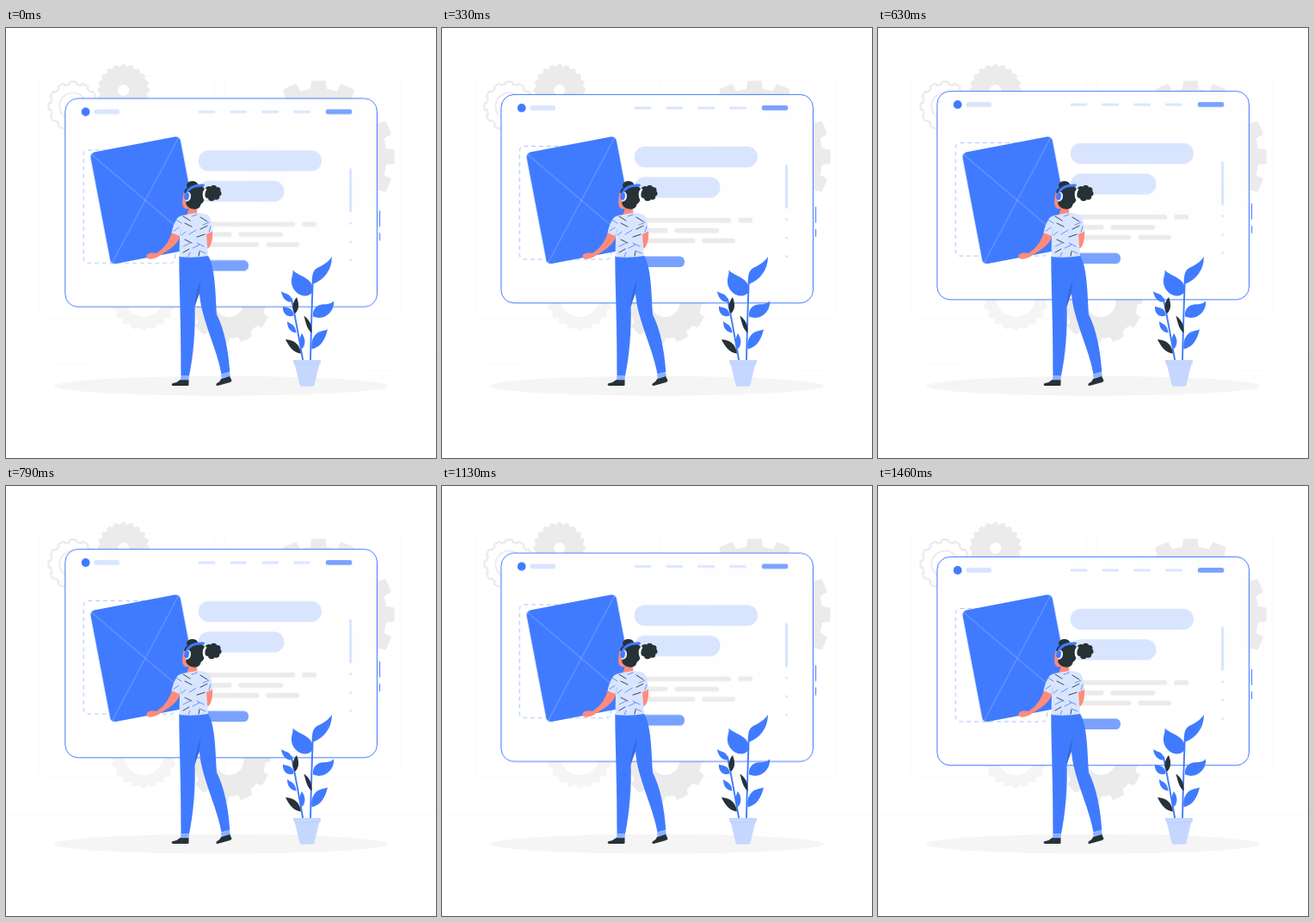
Recreate the animation shown at these times as an HTML page. Size 500 by 500 pixels, loop 1500 ms.

```html
<!DOCTYPE html>
<html lang="en">
<head>
<meta charset="utf-8">
<title>Website builder</title>
<style>
  html, body { margin: 0; width: 100%; height: 100%; overflow: hidden; background: #fff; }
  svg { display: block; width: 100vw; height: 100vh; }
  .blue { fill: #407bff; }
  .pale { fill: #d9e5ff; }
  .mid { fill: #79a2ff; }
  .grey { fill: #ebebeb; }
  .dark { fill: #263238; }
  .skin { fill: #ff8b7b; }
  .line { fill: none; stroke: #407bff; stroke-linecap: round; }
  /* 24 steps per second, rising and falling at constant speed */
  #window { animation: hover 1.5s steps(18, start) -5ms infinite; }
  @keyframes hover {
    0%, 100% { transform: translateY(0); }
    50% { transform: translateY(-10px); }
  }
</style>
</head>
<body>
<svg viewBox="0 0 500 500">
  <defs>
    <clipPath id="shirtClip">
      <path id="shirt" d="M210 217C204 218 200 219 198 223C195 228 193.500 233 192.500 238L202 242L201.500 266Q218 268 235 265L233 240L240 236.500C240 229 238 221 235 217.500Q229 214.500 222 215Z"/>
    </clipPath>
  </defs>

  <g id="backdrop">
    <g fill="none" stroke="#ebebeb" stroke-width=".25">
      <rect x="38.500" y="55.200" width="204" height="282.400" rx="5.500"/>
      <rect x="254.500" y="55.200" width="204" height="282.400" rx="5.500"/>
    </g>
    <g class="grey">
      <rect y="382.300" width="500" height=".25"/>
      <rect x="416.800" y="398.500" width="33" height=".25"/>
      <rect x="396.600" y="389.200" width="19" height=".25"/>
      <rect x="52.500" y="390.800" width="43" height=".25"/>
      <rect x="104.500" y="390.800" width="6" height=".25"/>
      <rect x="131.500" y="395.100" width="93" height=".25"/>
    </g>
    <g id="gears"></g>
    <ellipse cx="250" cy="416.200" rx="194" ry="11.300" fill="#f5f5f5"/>
  </g>

  <g id="window">
    <rect x="68.800" y="82.400" width="362.700" height="242.400" rx="15" fill="#fff" fill-opacity=".94" stroke="#407bff"/>
    <circle class="blue" cx="92.600" cy="98" r="4.900"/>
    <g id="bars"></g>
    <g class="pale">
      <circle cx="400.600" cy="227.500" r="1.500"/>
      <circle cx="400.600" cy="249.100" r="1.500"/>
      <circle cx="400.600" cy="270.600" r="1.500"/>
    </g>
    <path class="line" d="M434.700 213.300V231.100M434.700 239.100V247.300"/>
    <rect x="90.200" y="142.400" width="106.300" height="131.600" rx="5" fill="none" stroke="#a6c2ff" stroke-dasharray="5 3.800"/>
  </g>

  <g transform="translate(162 200.300) rotate(-10.800)">
    <rect class="blue" x="-53.200" y="-65.900" width="106.400" height="131.800" rx="5.500"/>
    <path d="M-51.600 -64.300L51.600 64.300M51.600 -64.300L-51.600 64.300" stroke="#8cb0ff" stroke-width=".8"/>
  </g>

  <g id="plant">
    <g class="line" stroke-width="1.900">
      <path d="M354 388C354.500 360 355.500 330 356.800 291"/>
      <path d="M345.500 388C341 362 337 340 332 315"/>
    </g>
    <g class="blue">
      <path d="M356.500 298C355 284 358 280.500 366 277C372 274 376 270 379 266C379 281 370 293 356.500 298Z"/>
      <path d="M333.500 281.500C341 289.500 357.500 290 357.200 306C354 311 349 312.300 344 311C335.500 308 331 300 332 292.500C332.500 288 334 286 333.500 281.500Z"/>
      <path d="M357 335.500C356 325 363 321.500 370 321.300C376 321 379 320 381 317.500C382.500 329 371 341 357 335.500Z"/>
      <path d="M355.500 373.500C354 362 359 356 364 353.500C368 351.500 371 352 374 350.500C371 363 366 371 355.500 373.500Z"/>
      <path d="M320 306C325 310 331.500 308 333 318.500C326 319.500 321 314 320 306Z"/>
      <path d="M322 323.500C326 326 334 324 334.500 334.500C328 337.500 321 332 322 323.500Z"/>
      <path d="M327 341C331 345 336.500 344 337.500 354.500C331 354 327 349 327 341Z"/>
      <path d="M344 355C348 361 349 367 344.500 373C339 368 341 361 344 355Z"/>
    </g>
    <g class="dark">
      <path d="M346.500 334.500C352 339.500 356 343 355.500 354.500C350.500 351 348.500 343 346.500 334.500Z"/>
      <path d="M338 313C341.500 322 340.500 328 336 332C332 326 333 319 338 313Z"/>
      <path d="M325 362.300C333 362.800 341 365.500 343 378.500C335 378.500 329 370.500 325 362.300Z"/>
    </g>
    <path fill="#c6d7ff" d="M334.500 386H365.500Q366.300 386 366.100 387L365.300 391H364.300L358.500 415Q358 416.800 356 416.800H344Q342 416.800 341.500 415L335.700 391H334.700L333.900 387Q333.700 386 334.500 386Z"/>
    <path d="M335.800 390.900H364.200" stroke="#b3c9ff" stroke-width=".6"/>
  </g>

  <g id="woman">
    <path class="skin" d="M232 236L240 235C240.500 243 239.500 250 237 254C235 257 231 258 228 257Z"/>
    <g class="dark">
      <path d="M203 408.800L212.500 409V415.300Q212.500 416 211 416H194Q191.500 415 193.500 413.300Q199 412.500 203 408.800Z"/>
      <path d="M250.500 407.500L260 404.500L262.500 410Q262.500 411.200 260.500 412L246 416Q243.500 415.500 244.800 413.500Q249 411.500 250.500 407.500Z"/>
    </g>
    <path class="blue" d="M201.300 265C201.300 300 203.700 340 203.500 404.500H213C218 380 220.500 350 219.500 325C222 315 224 312 225 309C226 322 229 332 233 345C239 364 247 383 250.500 402.500L260.300 400C258.500 373 253.500 350 245 333C243.500 310 243.500 277 234.500 264Z"/>
    <path d="M226.500 294C225.500 306 223 313 219.500 324C220 311 223 302 226.500 294Z" fill="#3061cc" fill-opacity=".75"/>
    <path d="M203.300 404.300H213L212.500 409.300H203.200ZM249.900 402.800L260.200 400.200L260.800 404.800L251 408Z" fill="#8cb0ff"/>

    <path class="skin" d="M193 237L203.500 240C200 250 194 255 187 259.500C181 263 177 266.800 171.500 268C168 269 164.500 269 163.700 267C162.700 263.500 165 261.800 169 261.500L175.500 261.700C182 257 189 251 193 237Z"/>
    <path class="skin" d="M211 206L221.500 207L222.500 216Q217 219 210 217.500L212.500 211Z"/>
    <use href="#shirt" class="pale"/>
    <g clip-path="url(#shirtClip)" fill="none" stroke-linecap="round">
      <path stroke="#263238" stroke-width=".9" d="M206 219l8 5M226 220l8 5M208 227l8 4M226 234l8-4M208 246l8 4M222 243l9-3M206 261l7-4M224 265l1-5"/>
      <path stroke="#407bff" stroke-width=".8" d="M198 223l6 4M216 219l6-2M195 236l6-4M229 229l7-3M213 240l8-5M204 241l5-4M222 250l8 4M206 254l8-4M217 256l8-4M225 259l7 3M212 266l2-5M236 237l2-6"/>
    </g>
    <path d="M201.700 241.500L204 234" stroke="#9dbbff" stroke-width=".6"/>

    <path class="skin" d="M207 190C205.500 195 204.700 202 205.500 206C206.500 210.500 210 210.800 213.500 210L220 206L217 191Z"/>
    <g class="dark">
      <path d="M207 191.500C208 187 211 185 214 184L224 182.500C231 184 233.500 190 232 196C231 200 229.500 203 226.500 205C226 209.500 221.500 211.300 218 210.500C213 210 209.500 207 209 203L212 200L209.500 193Z"/>
      <ellipse cx="216.700" cy="183" rx="6.700" ry="5"/>
      <g id="tail">
        <circle cx="236" cy="188.500" r="4.500"/><circle cx="241.500" cy="186.500" r="3.800"/>
        <circle cx="246" cy="188.500" r="3.500"/><circle cx="247.500" cy="192.500" r="3"/>
        <circle cx="244.500" cy="196" r="3.800"/><circle cx="239" cy="197.300" r="4"/>
        <circle cx="235.200" cy="193.500" r="4.600"/><circle cx="241" cy="191.500" r="5"/>
      </g>
    </g>
    <path d="M232.500 187Q227.500 193 232 200.500" fill="none" stroke="#fff" stroke-width="2.600"/>
    <path d="M210 192C212 187 218 182.500 229.500 183" fill="none" stroke="#407bff" stroke-width="3" stroke-linecap="round"/>
    <ellipse cx="211.500" cy="196" rx="3.500" ry="5.500" fill="#e6eeff" transform="rotate(10 211 196)"/>
    <ellipse class="blue" cx="210" cy="195.700" rx="2.800" ry="4.400" transform="rotate(10 210 196)"/>
  </g>
</svg>
<script>
  const add = (parent, tag, attrs) => {
    const el = document.createElementNS('http://www.w3.org/2000/svg', tag);
    for (const key in attrs) el.setAttribute(key, attrs[key]);
    document.getElementById(parent).append(el);
  };

  // Toothed outline; turn is the first tooth's offset from the top, in teeth.
  const teeth = (cx, cy, tip, root, count, turn = 0) => {
    const step = 2 * Math.PI / count;
    const points = [];
    for (let i = 0; i < count; i++) {
      for (const [r, part] of [[root, -.31], [tip, -.24], [tip, 0], [tip, .24], [root, .31], [root, .5]]) {
        const a = (i + part + turn) * step - Math.PI / 2;
        points.push((cx + r * Math.cos(a)).toFixed(2) + ' ' + (cy + r * Math.sin(a)).toFixed(2));
      }
    }
    return 'M' + points.join('L') + 'Z';
  };
  const hole = (cx, cy, r) => `M${cx - r} ${cy}a${r} ${r} 0 1 0 ${2 * r} 0a${r} ${r} 0 1 0 ${-2 * r} 0Z`;
  const gear = (cx, cy, tip, root, count, bore, fill, turn) => add('gears', 'path', {
    d: teeth(cx, cy, tip, root, count, turn) + hole(cx, cy, bore), fill, 'fill-rule': 'evenodd'
  });

  add('gears', 'path', {
    d: teeth(78, 91, 28.7, 26, 12), fill: 'none', stroke: '#ebebeb', 'stroke-width': 2.2, 'stroke-linejoin': 'round'
  });
  add('gears', 'circle', { cx: 78, cy: 91, r: 15.7, fill: 'none', stroke: '#ebebeb', 'stroke-width': 1.8 });
  gear(136.6, 72.3, 30.2, 28, 20, 6.5, '#ebebeb');
  gear(363.5, 149.5, 88.3, 79, 16, 45, '#ebebeb');
  gear(160, 313, 38.3, 35.5, 20, 23, '#f5f5f5');
  gear(259.5, 319, 48, 42, 10, 17, '#ebebeb', .3);

  const bar = (cls, x, y, width, height, r = height / 2) =>
    add('bars', 'rect', { class: cls, x, y, width, height, rx: r });

  bar('pale', 102.3, 95, 29.7, 5.8);
  for (let i = 0; i < 4; i++) bar('pale', 223.7 + i * 36.8, 96.4, 19.6, 3, 1.2);
  bar('mid', 371.8, 95, 30.6, 5.8, 2.5);
  bar('pale', 223.7, 142.8, 143.3, 24.2);
  bar('pale', 223.7, 178.3, 99.8, 24.2);
  bar('grey', 223.7, 225.8, 112.5, 5.7);
  bar('grey', 344.2, 225.8, 17, 5.7);
  bar('grey', 223.7, 237.7, 38.8, 5.7);
  bar('grey', 270.4, 237.7, 52, 5.7);
  bar('grey', 223.7, 249.5, 70.8, 5.7);
  bar('grey', 302.3, 249.5, 38.8, 5.7);
  bar('mid', 223.7, 270.6, 58.3, 12.5, 5.5);
  bar('pale', 399.1, 163.5, 3.1, 51.5, 1.5);
</script>
</body>
</html>
```
